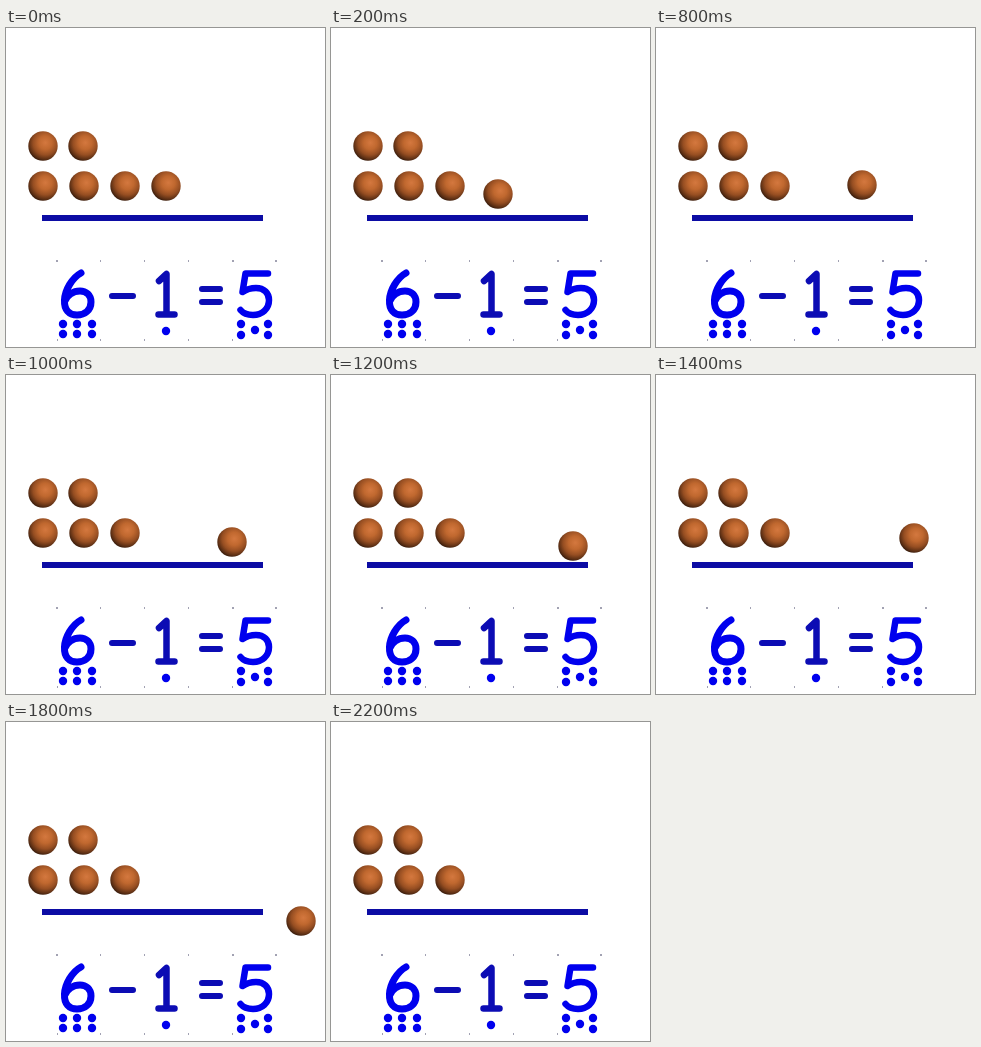
These frames come from a looping animation (319 by 319 pixels, 2400 ms). An HTML page:

```html
<!DOCTYPE html>
<html lang="en">
<head>
<meta charset="utf-8">
<title>Six minus one</title>
<style>
  html, body { margin: 0; width: 100%; height: 100%; overflow: hidden; background: #fff; }
  svg { display: block; width: 100%; height: 100%; }
  .ink { fill: none; stroke-linecap: round; stroke-linejoin: round; }
</style>
</head>
<body>
<svg viewBox="0 0 319 319" role="img" aria-label="6 - 1 = 5">
  <defs>
    <radialGradient id="shade" cx=".5" cy=".5" r=".64" gradientTransform="translate(.08 -.11)">
      <stop offset="0" stop-color="#d4783f"/>
      <stop offset=".35" stop-color="#c0682f"/>
      <stop offset=".65" stop-color="#964e22"/>
      <stop offset=".88" stop-color="#5c2f14"/>
      <stop offset="1" stop-color="#351a0b"/>
    </radialGradient>
    <circle id="ball" r="14.7" fill="url(#shade)"/>
  </defs>

  <path d="M36 190H257" stroke="#0c0ca4" stroke-width="6"/>

  <g class="ink" stroke="#0000ee" stroke-width="7">
    <path d="M75 245C66 250 59 262 58.5 272C58 282 63 287 71 287C79 287 85 282 85 274C85 267 80 263 74 263C67 263 61 267 59 273"/>
    <path stroke-width="6.5" d="M262 245.5H239.5L236.5 264C241 261 246 260 250 260C258 260 263 265 263 272C263 281 256 287 247 287C241 287 237 285 234.5 282"/>
  </g>
  <g class="ink" stroke="#0c0cb4" stroke-width="6">
    <path d="M106 268H127M196 261H214M196 274H214"/>
    <path stroke-width="6.5" d="M153 253L160.5 246V286M152.5 286.5H168.5"/>
  </g>

  <g id="dots" fill="#0000ee"></g>
  <path d="M50 233h2M94 233h1M138 233h1M182 233h1M226 233h2M269 233h2M94 312h1M138 312h1M182 312h1M51 312h1M226 312h1" stroke="#446" stroke-width="1"/>
  <g id="balls"></g>
  <use id="mover" href="#ball"/>
</svg>
<script>
  const get = id => document.getElementById(id);

  get('balls').innerHTML = [[37, 118], [77, 118], [37, 158], [78, 158], [119, 158]]
    .map(([x, y]) => `<use href="#ball" x="${x}" y="${y}"/>`).join('');

  const dots = [[160, 303], [235, 296], [262, 296], [249, 302], [235, 307], [262, 307]];
  for (const x of [57, 71, 86]) dots.push([x, 296], [x, 306]);
  get('dots').innerHTML = dots
    .map(([x, y]) => `<circle cx="${x}" cy="${y}" r="4.2"/>`).join('');

  // The ball hops along the bar, then drops off its end and is gone.
  const STEP = 200;
  const hops = [
    [160, 158], [167, 166], [176, 171], [186, 162], [206, 157], [226, 167],
    [242, 171], [258, 163], [283, 171], [295, 199], [306, 241], null
  ];

  const mover = get('mover');
  const start = performance.now();

  function draw(now) {
    const elapsed = Math.max(0, now - start);
    const spot = hops[Math.floor(elapsed / STEP) % hops.length];
    mover.setAttribute('visibility', spot ? 'visible' : 'hidden');
    if (spot) mover.setAttribute('transform', `translate(${spot})`);
    requestAnimationFrame(draw);
  }
  draw(start);
</script>
</body>
</html>
```
